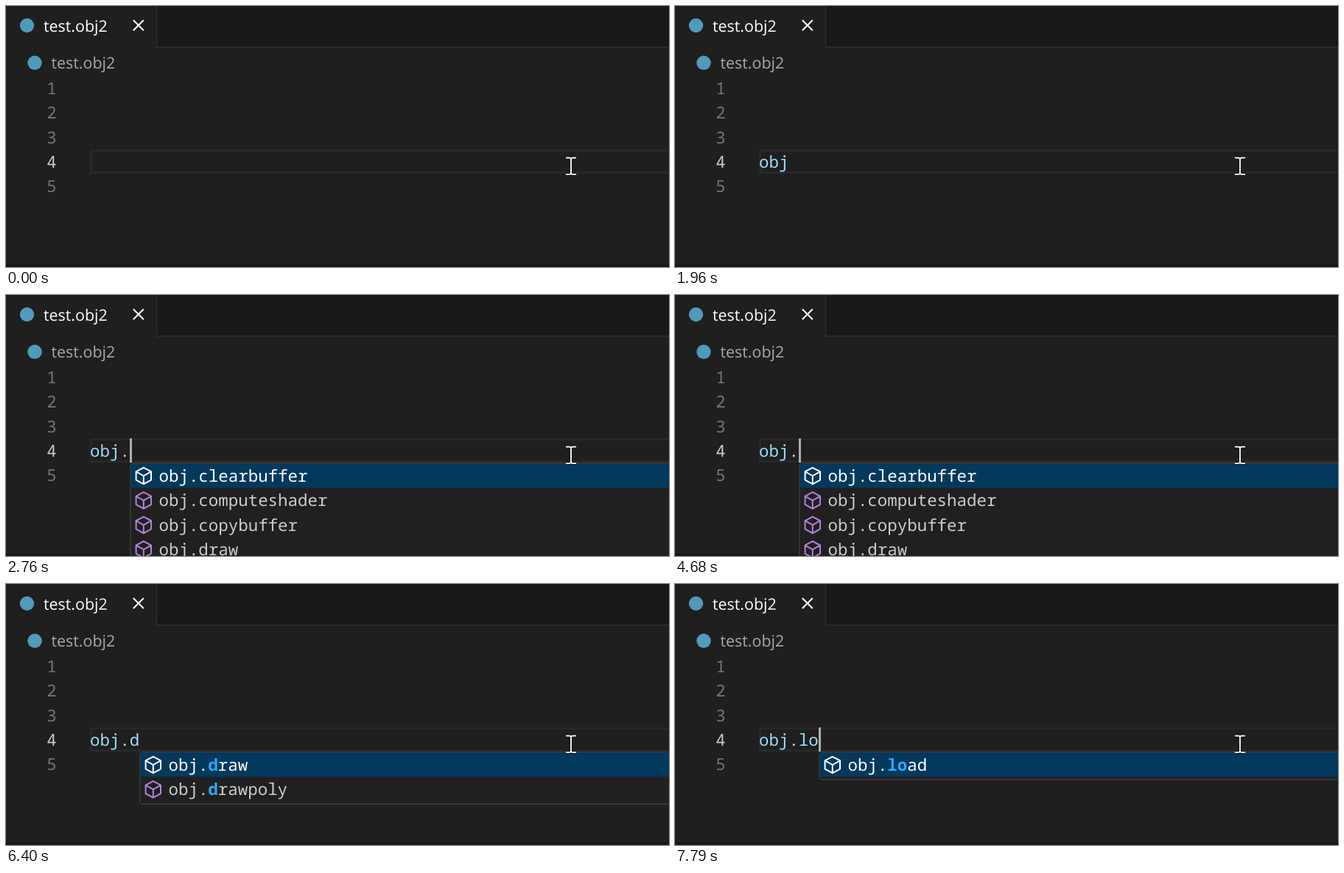
These frames come from a looping animation (900 by 355 pixels, 8000 ms). An HTML page:

```html
<!DOCTYPE html>
<html lang="en">
<head>
<meta charset="utf-8">
<title>Editor completion</title>
<style>
  html, body { margin: 0; width: 100%; height: 100%; overflow: hidden; background: #1f1f1f; }
  svg { display: block; width: 900px; height: 355px; }
  text { text-rendering: geometricPrecision; }
  .ui { font: 21.4px "Open Sans", "Noto Sans", sans-serif; }
  .code { font: 22.45px "Noto Sans Mono", "DejaVu Sans Mono", monospace; }
  .hit { fill: #2aaaff; font-weight: 700; }
  .line { fill: none; stroke-width: 2; }
</style>
</head>
<body>
<svg viewBox="0 0 900 355">
  <rect width="900" height="355" fill="#1f1f1f"/>
  <rect x="204" width="696" height="56" fill="#181818"/>
  <path d="M204.5 0V56H900" fill="none" stroke="#2b2b2b" stroke-width="1.8"/>
  <rect y="351" width="900" height="4" fill="#1a1618"/>

  <circle cx="28.5" cy="26.5" r="9.7" fill="#519aba"/>
  <text class="ui" x="51" y="35" fill="#fff">test.obj2</text>
  <path class="line" d="M172.8 19.3l14 14m0-14l-14 14" stroke="#fff"/>
  <circle cx="39" cy="77.3" r="9.7" fill="#519aba"/>
  <text class="ui" x="61.5" y="85" fill="#a9a9a9">test.obj2</text>

  <g id="numbers" class="code" text-anchor="end"></g>
  <rect x="115.5" y="196.5" width="800" height="30" fill="none" stroke="#282828" stroke-width="3"/>
  <text id="typed" class="code" x="114" y="220"></text>
  <rect id="caret" y="195" width="3" height="33" fill="#aeafad"/>
  <g id="popup" class="code"></g>

  <g id="beam" fill="none">
    <path id="beamShape" d="M760 206.5h5.5l1.5 1.5l1.5-1.5h5.5M767 208v19.5M760 229h5.5l1.5-1.5l1.5 1.5h5.5" stroke="#111" stroke-width="4"/>
    <use href="#beamShape"/>
    <path d="M760 206.5h5.5l1.5 1.5l1.5-1.5h5.5M767 208v19.5M760 229h5.5l1.5-1.5l1.5 1.5h5.5" stroke="#f0f0f0" stroke-width="2"/>
  </g>
  <path id="arrow" d="M767.7 209v24.5l5.6-5.3l3.9 8.3l4-1.8l-3.9-8.1h7.4z" fill="#fff" stroke="#000" stroke-width="1.3"/>
</svg>
<script>
const LOOP = 8000, CHAR = 13.47, LEFT = 114, ROW = 33.4;
const WORDS = ["clearbuffer", "computeshader", "copybuffer", "draw", "drawpoly", "load"];

// start time, typed text, caret visible, list open
const STEPS = [
  [0, "", 0, 0], [150, "", 1, 0], [670, "", 0, 0],
  [1040, "o", 1, 0], [1310, "ob", 1, 0],
  [1500, "obj", 1, 0], [1960, "obj", 0, 0], [2490, "obj", 1, 0],
  [2700, "obj.", 1, 0], [2760, "obj.", 1, 1], [3230, "obj.", 0, 1],
  [3710, "obj.", 1, 1], [4220, "obj.", 0, 1], [4680, "obj.", 1, 1],
  [4890, "obj.d", 1, 1], [5410, "obj.d", 0, 1], [5870, "obj.d", 1, 1], [6400, "obj.d", 0, 1],
  [6860, "obj.", 1, 1],
  [7130, "obj.l", 1, 1], [7590, "obj.l", 0, 1],
  [7790, "obj.lo", 1, 1]
];

const $ = id => document.getElementById(id);
const show = (id, on) => $(id).setAttribute("visibility", on ? "visible" : "hidden");

$("numbers").innerHTML = [1, 2, 3, 4, 5].map((n, i) =>
  `<text x="68.8" y="${120 + 33.3 * i}" fill="${n === 4 ? "#ccc" : "#6e7681"}">${n}</text>`).join("");

function cube(x, y, color) {
  return `<path class="line" stroke="${color}" stroke-linejoin="round" transform="translate(${x} ${y})"
    d="M0-11.2L10.2-5.8V5.6L0 11.2L-10.2 5.6V-5.8ZM-10-5.6L0 0L10-5.6M0 0V11"/>`;
}

function listMarkup(left, prefix) {
  const words = WORDS.filter(w => w.startsWith(prefix));
  const rows = words.map((w, i) => {
    const picked = i === 0, y = 246 + ROW * i;
    const hit = prefix && `<tspan class="hit">${prefix}</tspan>`;
    return (picked ? `<rect x="${left + 1}" y="229.3" width="800" height="33" fill="#04395e"/>` : "") +
      cube(left + 18.3, y, picked ? "#fff" : "#b180d7") +
      `<text x="${left + 39}" y="${y + 8}" fill="${picked ? "#fff" : "#ccc"}">obj.${hit}${w.slice(prefix.length)}</text>`;
  });
  return `<rect x="${left + 0.5}" y="228.5" width="802" height="${words.length * ROW + 4}" rx="4"
    fill="#202020" stroke="#454545" stroke-width="1.2"/>` + rows.join("");
}

function draw([, text, caret, open]) {
  const edge = Math.floor(LEFT + CHAR * text.length + 0.4);
  const [name, rest] = text.split(".");
  $("typed").innerHTML = `<tspan fill="#9cdcfe">${name}</tspan>` +
    (rest === undefined ? "" : `<tspan fill="#d4d4d4">.</tspan><tspan fill="#9cdcfe">${rest}</tspan>`);
  $("caret").setAttribute("x", edge);
  show("caret", caret);
  $("popup").innerHTML = open ? listMarkup(edge + 0.5, rest) : "";
}

let last = null;
const start = performance.now();
function tick() {
  const t = (performance.now() - start) % LOOP;
  const step = STEPS.findLast(s => s[0] <= t);
  if (step !== last) draw(last = step);
  const pointing = t >= 150 && t < 200;
  show("arrow", pointing);
  show("beam", !pointing);
  requestAnimationFrame(tick);
}
tick();
</script>
</body>
</html>
```
